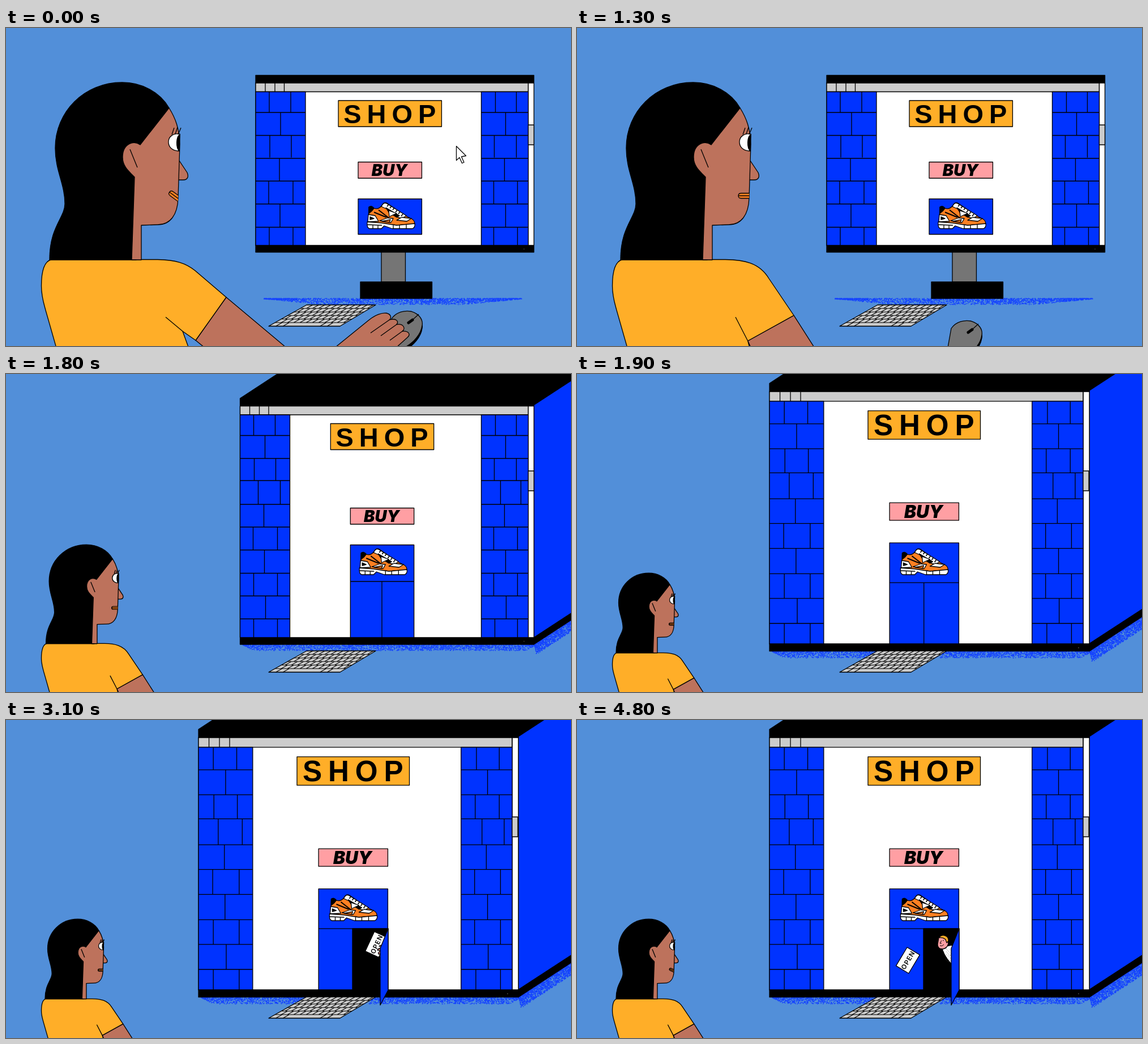
Animation, 998 px wide and 561 px high, one loop 5.7 s. Source, as an HTML page:

```html
<!DOCTYPE html>
<html lang="en">
<head>
<meta charset="utf-8">
<title>Shop</title>
<style>
html, body { margin: 0; width: 100%; height: 100%; overflow: hidden; background: #528fd9; }
svg { display: block; width: 998px; height: 561px; stroke: #000; stroke-width: 1.3; stroke-linejoin: round; }
svg * { vector-effect: non-scaling-stroke; }
text { fill: #000; stroke: none; }
.shop { font: bold 47px "Liberation Sans", Arial, sans-serif; letter-spacing: 10px; }
.buy { font: italic 900 29px Inter, sans-serif; text-anchor: middle; }
.open { font: 600 11.5px Inter, sans-serif; letter-spacing: 1px; text-anchor: middle; }
</style>
</head>
<body>
<svg id="stage" viewBox="0 0 998 561"></svg>
<script>
const STEP = 100, STEPS = 57;
const BLUE = '#0033ff', SKIN = '#bd725c', GOLD = '#ffae28', PINK = '#ff9fa3',
      ORANGE = '#ff8022', GREY = '#ccc', STEEL = '#757575', BLACK = '#000', WHITE = '#fff';

// Tables of [step, value]; a value holds until the next entry.
const MOUTH = [[0, 36], [3, 30], [5, 23], [6, 16], [7, 11], [9, 8], [12, 0], [45, 8], [46, 16], [48, 25]];
const REACH = [[0, 0], [3, .03], [5, .06], [6, .1], [7, .15], [10, .3], [11, .55], [12, .8], [13, 1]];
const MOUSE = [[0, [0, 0]], [3, [-4, 3]], [5, [-9, 8]], [6, [-15, 13]], [7, [-20, 17]], [15, [0, 34]], [16, [18, 51]], [17, [40, 80]]];
const HAND = [[0, [0, 0]], [3, [-4, 3]], [5, [-10, 7]], [6, [-16, 11]], [7, [-23, 15]], [10, [-38, 30]], [11, [-60, 50]], [12, [-90, 75]]];
const CURSOR = [[0, [795.5, 208.5]], [3, [790, 213]], [5, [777, 221]], [6, [765, 233]], [7, [757, 240]], [9, null]];
const BURST = [[0, null], [9, [7, 14]], [10, [10, 17]], [11, [14, 18]], [12, null]];
const VIEW = [
  [0, { s: 1, left: 441, top: 97, base: 383.5, depth: 0 }],
  [15, { s: .97, left: 441, top: 97, base: 420, depth: 0 }],
  [16, { s: .905, left: 441, top: 97, base: 465, depth: 0 }],
  [17, { s: .74, left: 428, top: 78, base: 465, depth: .5 }],
  [18, { s: .558, left: 413.5, top: 56.5, base: 465, depth: 1 }],
  [19, { s: .45, left: 413.5, top: 56.5, base: 465, depth: 1, big: true }]
];
const DOOR = [[0, null], [24, [615, 374, 484]], [25, [632, 384, 491]], [26, [648, 395, 498]], [27, [661, 403, 503]]];
const CLERK = [[0, null], [30, 20], [31, 9], [32, 0]];
const ARM = [[0, 85], [31, 70], [32, 54], [33, 34], [34, 15], [35, 0], [41, 12], [42, 28], [43, 48], [44, null]];
const TILT = [[0, -6], [35, 0], [36, 4], [37, 0]];

const at = (table, n) => table.filter(k => k[0] <= n).pop()[1];
const path = (d, fill = 'none', extra = '') => `<path d="${d}" fill="${fill}" ${extra}/>`;
const poly = (pts, fill, extra) => path('M' + pts.map(p => p.join(' ')).join('L') + 'Z', fill, extra);
const box = (x0, y0, x1, y1, fill) => poly([[x0, y0], [x1, y0], [x1, y1], [x0, y1]], fill);
const group = (transform, body) => `<g transform="${transform}">${body}</g>`;

// Stippled shade hanging below the line x0,y0 - x1,y1.
function grain(x0, y0, x1, y1, h, count, taper) {
  let seed = 7, d = '';
  const rnd = () => (seed = (seed * 16807) % 2147483647) / 2147483647;
  for (let i = 0; i < count; i++) {
    const u = rnd(), v = rnd() ** 1.4 * h * Math.min(1, .1 + u / taper, .1 + (1 - u) / taper);
    d += `M${(x0 + (x1 - x0) * u).toFixed(1)} ${(y0 + (y1 - y0) * u + v).toFixed(1)}h1.5`;
  }
  return path(d, 'none', `stroke="#1442ff" stroke-width="1.5"`);
}

function keyboard() {
  const pt = (u, v) => `${531 - 67 * v + u * (122 + 4 * v)} ${488.5 + 37.5 * v}`;
  let d = '';
  for (let r = 0; r < 6; r++) {
    const a = r / 6, b = (r + 1) / 6;
    if (r) d += `M${pt(0, a)}L${pt(1, a)}`;
    const cols = r < 5 ? Array.from({ length: 11 }, (_, i) => (i + 1 - r % 2 * .4) / 11.4) : [.1, .2, .72, .82];
    for (const u of cols) d += `M${pt(u, a)}L${pt(u, b)}`;
  }
  return path(`M${pt(0, 0)}L${pt(1, 0)}L${pt(1, 1)}L${pt(0, 1)}Z`, GREY) + path(d, 'none', 'stroke-width="1.1"');
}

const ROWS = [72.5, 108.5, 149, 188, 230, 270, 310.5, 351.5, 391.5, 432, 465];
const JOINTS_L = [[24, 62], [44], [25, 63], [32, 71], [42], [23, 66], [43], [24, 66], [45], [24, 66]];
const JOINTS_R = [[25, 62], [43], [23, 62], [34, 70], [41], [22, 64], [43], [22, 64], [44], [24, 64]];

function bricks(x, w, joints, v) {
  const flat = v.top > 90;
  const ys = ROWS.map((y, i) => Math.min(v.base, i < 4 ? y + v.top - 56.5 : y));
  let d = '';
  joints.forEach((row, i) => {
    const y0 = ys[i], y1 = ys[i + 1];
    if (y1 - y0 < 4) return;
    if (i && !(flat && i > 8)) d += `M${x} ${y0}h${w}`;
    for (const j of flat && i > 7 ? joints[7] : row) d += `M${x + j} ${y0}V${y1}`;
  });
  return box(x, v.top + 15.5, x + w, v.base, BLUE) + path(d);
}

const shoe = () =>
  path('M640 342L641 316Q645 313 650 318Q658 321 664 313Q667 306 673 309L703 330L713 335Q722 338 722 346L690 348Z', ORANGE) +
  path('M641 327V316Q645 312 650 318L646 323Z', BLACK) +
  path('M663 315Q667 306 673 310L707 331L700 336L692 334L672 319Z', WHITE) +
  path('M671 317L695 331L690 334L676 325Z', BLACK) +
  path('M676 322L690 327L683 330L677 333Z', WHITE) +
  path('M690 339L699 334L716 336L708 341Z', WHITE) +
  path('M640 329L652 331L658 341L639 342Z', WHITE) +
  path('M643 333L650 336L643 338Z', BLACK) +
  path('M660 340L680 343L684 336L674 335Z', WHITE) +
  path('M664 341L677 343L679 338Z', ORANGE) +
  path('M650 325L672 334M658 321L676 335', 'none', 'stroke-width="2"') +
  path('M676 311l-3 4M681 314l-3 4M686 317l-3 4M691 321l-3 4M696 324l-3 4M701 328l-3 4', 'none', 'stroke-width="1.6"') +
  path('M638 342L664 344L690 348L722 345Q723 352 718 354H682L668 349L663 354H642Q637 353 638 342Z', WHITE) +
  path('M638 347L664 348M648 348V354M657 348V354M684 348V354M695 348V354M707 347V354');

function building(v) {
  const L = v.left, T = v.top, B = v.base, R = 932.5;
  const mid = (L + 915.5) / 2, dx = 150 * v.depth, dy = -98 * v.depth;
  const side = (y0, y1, fill) => v.depth ? poly([[R, y0], [R + dx, y0 + dy], [R + dx, y1 + dy], [R, y1]], fill) : '';
  let out = v.base < 400
    ? grain(455, 477, 910, 477, 11, 2000, .25)
    : grain(L + 4, 477, 936, 477, 11, 2400, .04);
  if (v.depth) out += grain(R, 475, R + 130, 390, 22, 2200, .03);
  if (B < 460) out += box(663, 390, 705.5, 448, STEEL) + box(626, 448, 752.5, 477, BLACK);
  const lintel = B < 400 ? 364 : 366;
  out += side(T - 2, 465, BLUE) + side(465, 477, BLACK) +
    poly([[L, T - 13.5], [L + dx, T - 13.5 + dy], [R + dx, T - (dx ? 2 : 13.5) + dy], [R, T - (dx ? 2 : 13.5)], [R, T], [L, T]], BLACK) +
    box(L, B, R, B + 12, BLACK) + `<circle cx="915" cy="${B + 6.5}" r=".8" fill="#555" stroke="none"/>` +
    box(L, T, R, B, WHITE) + box(L, T, 922.5, T + 15.5, GREY) +
    path([17, 34, 50.5].map(x => `M${L + x} ${T}v15.5`).join('') + `M922.5 ${T}V${B}`) +
    bricks(L, 88, JOINTS_L, v) + bricks(839.5, 83, JOINTS_R, v) +
    box(mid - 91.2, T + 31, mid + 91.2, T + 77, GOLD) +
    `<text class="shop" x="${mid - 82}" y="${T + 71}">SHOP</text>` +
    box(mid - 56.2, 236.5, mid + 56.2, 265, PINK) +
    `<text class="buy" x="${mid - 1}" y="261.3">BUY</text>` +
    box(mid - 56.2, 301.5, mid + 56.2, B < 400 ? 364 : B, BLUE);
  if (B > 400) out += path(`M${mid - 56.2} ${lintel}h112.4`);
  if (v.depth) out += path(`M${mid - .5} ${lintel}V${B}`);
  out = v.big ? group('matrix(1.0886 0 0 1.0886 -110.1 -30.3)', out) : out;
  const thumb = v.big ? 894 : 922.5;
  return out + box(thumb, 171, thumb + 10, 206, GREY) +
    group(`translate(${v.big ? -66.5 : mid - 678.2})`, shoe());
}

function clerk(n) {
  const slide = at(CLERK, n), reach = at(ARM, n);
  if (slide === null) return '';
  const out = n >= 35 ? 0 : reach;
  const body =
    path('M645 404Q652 397 666 397V434Q652 424 645 404Z', WHITE) +
    path(Array.from({ length: 26 }, (_, i) => `M${651 + i * 7 % 10} ${404 + i * 11 % 23}h.8`).join(''), 'none', 'stroke="#555" stroke-width=".8"') +
    path('M639 384Q646 377 654 384L656 394Q654 403 646 404Q637 404 637 396Z', PINK) +
    path('M640 384Q642 379 649 380Q657 382 656 390L653 393L651 387Q646 383 640 384Z', GOLD) +
    path('M644 389L641 394H644M641 398Q645 400 648 396M646 389h2', 'none', 'stroke-width="1"');
  const sign = group(`translate(${584.5 + out} ${424 - out * .4}) rotate(${at(TILT, n) - 59})`,
    box(-19, -13, 19, 13, WHITE) + '<text class="open" x=".5" y="4.2">OPEN</text>');
  const arm = reach === null ? '' : group(`translate(${reach} ${-reach * .4})`,
    path('M636 411L609 426Q603 423 598 427Q592 424 589 427L596 430Q587 430 586 434L594 435Q586 437 588 441L597 439Q591 443 595 446Q605 445 612 436L640 420Z', PINK) +
    path('M633 411L649 402L661 409L660 419L639 421Z', WHITE));
  return `<g clip-path="url(#way)">${group(`translate(${slide})`, body)}${sign}${arm}</g>`;
}

function door(n) {
  const leaf = at(DOOR, n);
  if (!leaf) return '';
  const [x, y0, y1] = leaf;
  return box(612, 368, 675, 476, BLACK) + clerk(n) +
    poly([[x, y0], [675, 368], [675, 476.5], [x, y1]], BLUE);
}

const FACE = 'M288 141C300 160 306 178 307 205L304 300C303 330 290 347 268 347L239 348V409H222L227 263C220 255 206 246 206 228C206 204 225 198 237 206Z';

function head(n) {
  const angle = at(MOUTH, n);
  const eye = n === 39
    ? path('M286 204Q296 212 307 213M292 209l-3 6M298 211l-1 7M304 213l1 7')
    : path('M307 187C295 185 287 192 287 201C287 211 295 217 306 217Z', WHITE) +
      path('M307 188C300 192 300 212 306 217Z', BLACK) +
      path('M293 188L297 176M299 187L303 175M304 188L309 176');
  return path('M288 141C272 113 240 96 205 96C138 96 87 148 87 212C87 252 104 275 104 310C104 335 77 350 77 409H230L240 210Z', BLACK) +
    path('M306 234L320 255C323 262 321 268 313 268H304', SKIN) + path(FACE, SKIN) +
    path('M219 214L232 246') + eye +
    `<g clip-path="url(#face)">${group(`translate(304 ${296 + angle * .13}) rotate(${angle})`,
      path('M6 -4.5H-14Q-19 -4.5 -19 0T-14 4.5H6Z', ORANGE) + path('M-19 0H6'))}</g>`;
}

function woman(n, s) {
  const k = at(REACH, n);
  const mix = (a, b) => a.map((p, i) => +(p + (b[i] - p) * k).toFixed(1)).join(' ');
  const tip = mix([389, 475], [383, 507]), pit = mix([335, 551], [301.7, 552]), fold = mix([282, 510], [280, 510]);
  const gap = mix([312, 535], [301.7, 552]);
  const body =
    path(`M${tip}L${mix([500, 568], [422, 568])}L${mix([356, 568], [309, 568])}L${pit}Z`, SKIN) +
    path(`M80 408.5C66 412 62.5 435 62.5 455C62.5 475 68 490 70 498L90 568H${mix([324], [306])}L${gap}L${pit}L${tip}` +
      `L${mix([334, 428], [339, 442])}C${mix([318, 415], [322, 414])} ${mix([300, 409], [295, 409])} ${mix([268, 408.5], [262, 408.5])}Z`, GOLD) +
    path(`M${fold}L${gap}`) + head(n);
  return group(`translate(62.5 560) scale(${s}) translate(-62.5 -560)`, body);
}

const MOUSE_BODY = 'M681 513C690 500 705 498 716 500C730 504 737 515 735 525C733 540 720 555 705 563L670 575Z';

function mouse(n) {
  const [x, y] = at(MOUSE, n), [hx, hy] = at(HAND, n);
  return group(`translate(${x} ${y})`,
      group('translate(0 5)', path(MOUSE_BODY, BLACK)) + path(MOUSE_BODY, STEEL) +
      path('M719 514L729 505') + path('M711 520L718 515', 'none', 'stroke-width="5" stroke-linecap="round"')) +
    (n < 13 ? group(`translate(${hx} ${hy})`,
      path('M545 593L640 516C652 506 664 502 672 503C681 505 681 512 677 515C690 511 694 518 690 523C703 521 706 531 700 535C712 534 715 541 709 546L660 590Z', SKIN) +
      path('M677 515L644 538M690 523L662 543M700 535L678 551')) : '');
}

function pointer(n) {
  const pos = at(CURSOR, n), rays = at(BURST, n);
  let out = pos ? group(`translate(${pos})`, path('M0 0V25L5.5 20L10 30L13.5 28.5L9 18.5L17 17Z', WHITE)) : '';
  if (rays) {
    for (let a = 30; a < 360; a += 60) out += group(`translate(759 241) rotate(${a})`, path(`M${rays[0]} 0H${rays[1]}`));
  }
  return out;
}

function scene(n) {
  const v = at(VIEW, n);
  return `<defs><clipPath id="face"><path d="${FACE}"/></clipPath>` +
    '<clipPath id="way"><path d="M552 368H675V476H552Z"/></clipPath></defs>' +
    building(v) + keyboard() + door(n) + pointer(n) + woman(n, v.s) + mouse(n);
}

const stage = document.getElementById('stage');
let shown = -1;
function tick() {
  const n = Math.floor(performance.now() / STEP) % STEPS;
  if (n !== shown) stage.innerHTML = scene(shown = n);
  requestAnimationFrame(tick);
}
tick();
</script>
</body>
</html>
```
